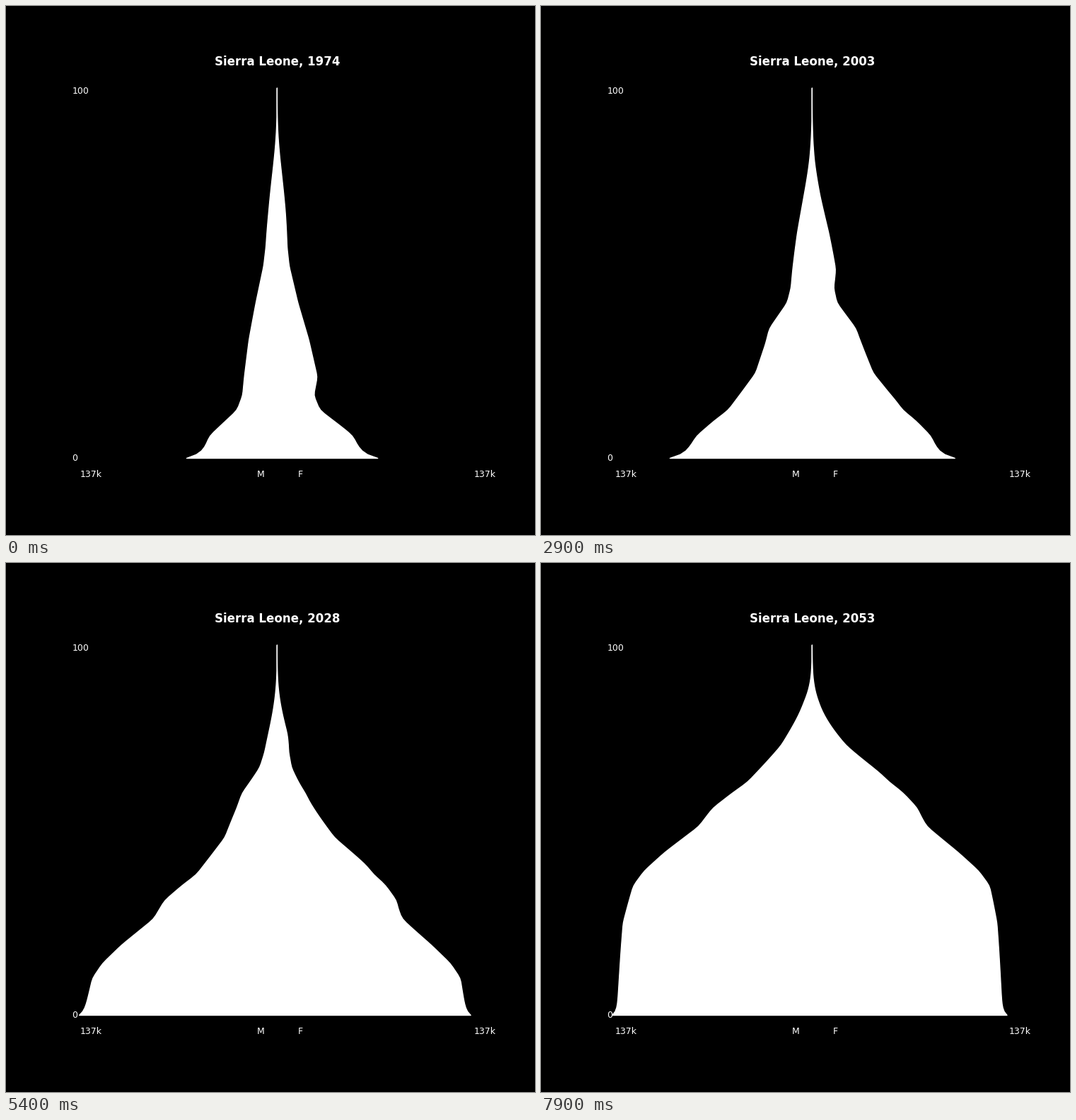
These frames come from a looping animation (748 px wide and 748 px high, 8 s). A matplotlib script:

```python
import numpy as np
import matplotlib.pyplot as plt
from matplotlib.animation import FuncAnimation
from matplotlib.patches import Polygon

DPI, SIZE = 100, 748
FIRST_YEAR, FRAMES = 1974, 80
LAST_YEAR = FIRST_YEAR + FRAMES - 1
AGES = np.arange(101)
BORN = np.arange(FIRST_YEAR - 100, LAST_YEAR + 1)

# Turning points of cohort size by birth year, as bar lengths in pixels
TURNS = [1874, 1907, 1917, 1922, 1932, 1942, 1952, 1957, 1961, 1966, 1968, 1972,
         1980, 1985, 1990, 1993, 1997, 2002, 2009, 2014, 2018, 2028, 2053]
MEN = [10, 11.2, 12, 13.5, 20.1, 26, 30, 31.5, 36.5, 54.5, 61.5, 66.5,
       80, 99, 118.5, 139, 163, 178, 223, 250, 264, 276, 283]
WOMEN = [10, 11, 10.7, 12.1, 19.7, 29.3, 36.8, 33.5, 39, 61, 69, 75,
         86, 103, 122, 142, 165, 179, 221, 248, 262, 270, 276]


def cohorts(sizes):
    """Yearly cohort sizes with slightly rounded corners."""
    yearly = np.pad(np.interp(BORN, TURNS, sizes), 1, mode="edge")
    return np.convolve(yearly, [0.25, 0.5, 0.25], mode="valid")


def bump(x, center, width):
    return np.exp(-((x - center) / width) ** 2)


def presence(year):
    """Share of all ages still in the country, falling sharply after 1991."""
    return np.exp(np.interp(year, [1974, 1984, 1991, 1995, 2001, 2010, 2021, 2053],
                            [.44, .365, .335, .075, .01, -.02, -.005, -.025]))


def survival(year):
    """Gompertz mortality, easing in the last years."""
    ease = np.interp(year, [2036, 2053], [1, 0.86])
    return np.exp(-0.00096 * ease * np.exp(0.09 * AGES))


def infants(born):
    """Extra newborns that are lost in the first years of life."""
    excess = np.maximum(0.025, 0.18 - 0.0032 * (born - 1974))
    return 1 + excess * np.exp(-AGES / 1.2)


def women_shift(year, born):
    """Slow drift of women's numbers away from men's between 1995 and 2021."""
    drift = 0.17 * bump(born, 1988, 8) - 0.29 * bump(born, 1966, 10)
    return 1 + np.interp(year, [1995, 2021], [0, 1]) * drift


SIZES_M, SIZES_F = cohorts(MEN), cohorts(WOMEN)


def profile(year):
    born = year - AGES
    i = born - BORN[0]
    common = presence(year) * survival(year) * infants(born)
    return SIZES_M[i] * common, SIZES_F[i] * common * women_shift(year, born)


fig = plt.figure(figsize=(SIZE / DPI, SIZE / DPI), dpi=DPI, facecolor="black")
ax = fig.add_axes([0.125, 0.11, 0.775, 0.77])
half = 0.775 * SIZE / 2
ax.set_xlim(-half, half)
ax.set_ylim(-5, 105)
ax.axis("off")

for x, y, label in [(0, 0.94, "100"), (0, 0.04, "0"), (0.02, 0, "137k"),
                    (0.45, 0, "M"), (0.55, 0, "F"), (0.98, 0, "137k")]:
    ax.text(x, y, label, transform=ax.transAxes, color="white",
            fontsize=9, family="DejaVu Sans")

title = ax.set_title("", color="white", fontsize=12, fontweight="bold",
                     family="DejaVu Sans", pad=4.3)
shape = Polygon(np.zeros((3, 2)), closed=True, facecolor="white",
                edgecolor="white", linewidth=1, joinstyle="round")
ax.add_patch(shape)


def update(i):
    year = FIRST_YEAR + i
    men, women = profile(year)
    shape.set_xy(np.column_stack([np.r_[-men, women[::-1]],
                                  np.r_[AGES, AGES[::-1]]]))
    title.set_text(f"Sierra Leone, {year}")
    return shape, title


anim = FuncAnimation(fig, update, frames=FRAMES, interval=100,
                     repeat=True, repeat_delay=0)
plt.show()
```
